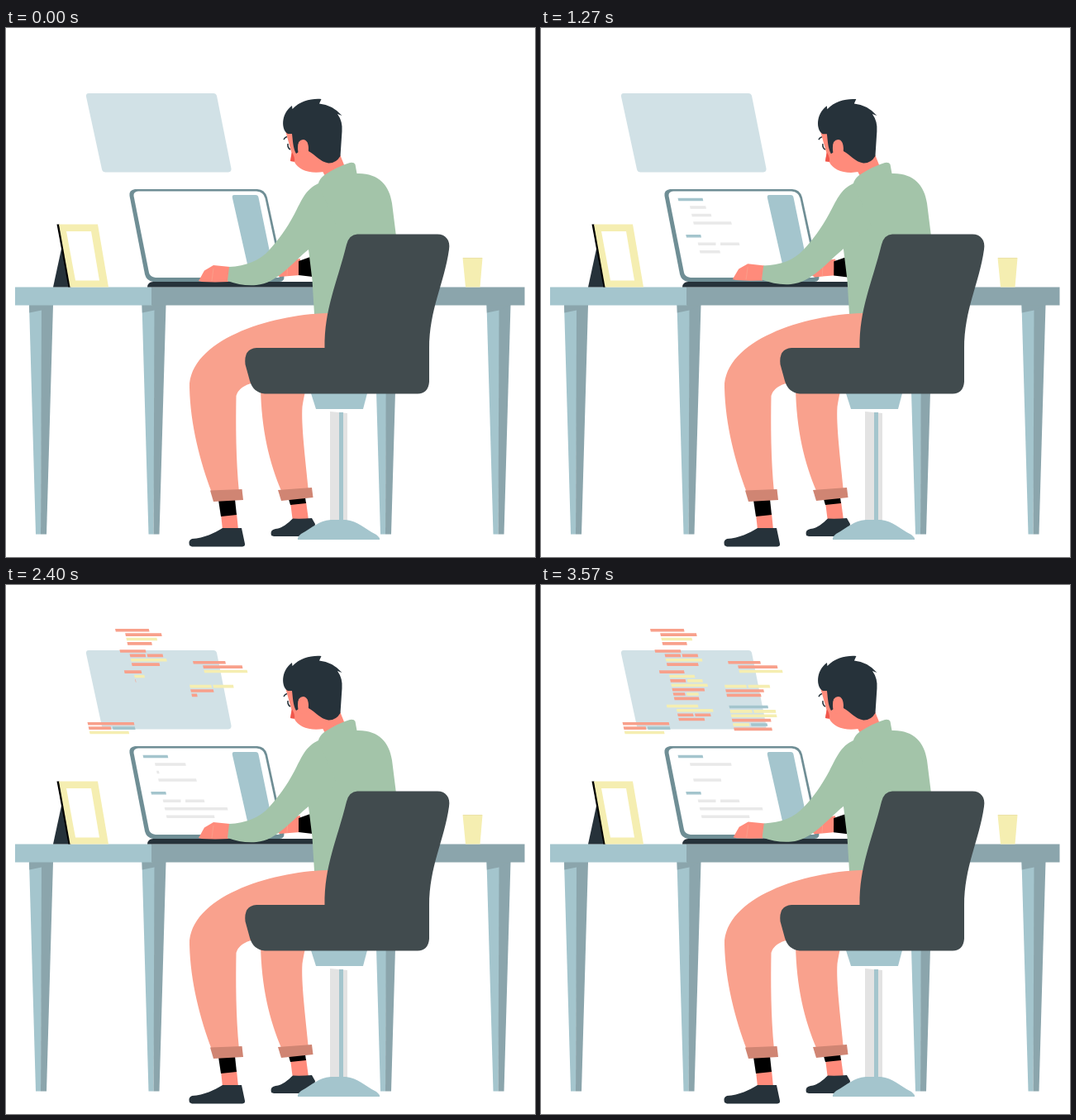
Recreate the animation shown at these times as an HTML page with a canvas. Size 640 by 640 pixels, loop 3.61 s.

```html
<!DOCTYPE html>
<html lang="en">
<head>
<meta charset="utf-8">
<title>At the desk</title>
<style>
html, body { margin: 0; width: 100%; height: 100%; overflow: hidden; background: #fff; }
canvas { display: block; width: 100vw; height: 100vh; }
</style>
</head>
<body>
<canvas id="stage" width="640" height="640"></canvas>
<script>
const ctx = document.getElementById('stage').getContext('2d');
const LOOP = 3610, CYCLE = 1200;
const NAVY = '#26323a', BLUE = '#a4c5cd', SHADE = '#8ba5ac', YELLOW = '#f5eeb1',
      SKIN = '#ff8b7b', PINK = '#f9a18d', GREEN = '#a3c4a9', GREY = '#e3e3e3',
      SLATE = '#414b4e', CUFF = '#d08573', PALE = '#e9e9e9';

const clamp = v => Math.max(0, Math.min(1, v));
const easeOut = u => 1 - (1 - clamp(u)) ** 2;

function fill(color, d) {
  ctx.fillStyle = color;
  ctx.fill(new Path2D(d));
}
function stroke(color, width, d) {
  ctx.strokeStyle = color;
  ctx.lineWidth = width;
  ctx.stroke(new Path2D(d));
}
// Blends two path strings that share the same commands.
function blend(from, to, k) {
  const ends = to.match(/-?[\d.]+/g);
  let i = 0;
  return from.replace(/-?[\d.]+/g, n => (+n + (ends[i++] - n) * k).toFixed(2));
}
// Slanted text bar.
function bar(color, x, width, y) {
  if (width < 0.4) return;
  fill(color, `M${x} ${y}h${width}l.8 3.6h${-width}Z`);
}

// Text follows the slant of its panel; rows below a block's first are indented.
const SLANT = 0.215;
const INK = { p: '#f8a08b', y: YELLOW, b: BLUE };
// Each word is a row and each letter a segment of it.
const panels = [
  { x: 132, y: 53, indent: 11, gap: 3.7, width: 36.5, peak: 11, start: 1467, step: 93,
    blocks: ['p p y p', 'p pp y p', 'p y py y p py p', 'y y pp p'] },
  { x: 226, y: 92, indent: 11, gap: 0, width: 45, peak: 2, start: 1755, step: 122, blocks: ['p p y'] },
  { x: 222, y: 120.8, indent: 0, gap: 8.8, width: 49, peak: 4.5, start: 2121, step: 122,
    blocks: ['yy p p', 'b yy y p yb p'] },
  { x: 98.5, y: 166, indent: 0, gap: 0, width: 50, peak: 0.5, start: 1660, step: 175, blocks: ['p pb y'] }
];

function drawPanel({ x, y, indent, gap, width, peak, start, step, blocks }, t) {
  let row = 0, top = y;
  for (const block of blocks) {
    block.split(' ').forEach((inks, line) => {
      const left = x + SLANT * (top - y) + (line ? indent : 0);
      const whole = width + 7.5 * Math.cos(1.23 * (row - peak));
      const part = (whole - 2 * (inks.length - 1)) / inks.length;
      const span = inks.length > 1 ? 260 : 430;
      [...inks].forEach((ink, j) => {
        const shown = easeOut((t - start - row * step - j * 85) / span);
        bar(INK[ink], left + j * (part + 2), part * shown, top);
      });
      row++;
      top += 5.37;
    });
    top += gap;
  }
}

// Laptop lines are typed one after another, then wiped and retyped in turn.
const noteWidths = [30, 50, 58, 46, 18, 50, 76, 58];

function noteShown(i, t) {
  const typed = clamp((t - 200 * i) / 220);
  const firstBlank = 930 + 250 * i - 13 * i * i;
  const period = 1080;
  const since = t - firstBlank;
  const nearest = since - Math.max(0, Math.round(since / period)) * period;
  return Math.min(typed, clamp((Math.abs(nearest) - 50) / 140));
}

function drawNotes(t) {
  noteWidths.forEach((width, i) => {
    const heading = i % 4 === 0;
    const y = 205.7 + 9.5 * i + (i > 3 ? 6.2 : 0);
    const x = 165.5 + 0.22 * (y - 205.7) + (heading ? 0 : 12.3);
    bar(heading ? BLUE : PALE, x, width * noteShown(i, t), y);
  });
  fill('#fff', 'M211.500 258H217V264H211.500Z');
}

function drawDesk() {
  for (const x of [0, 136.5, 417, 553.5]) {
    ctx.save();
    ctx.translate(x, 0);
    fill(BLUE, 'M28 335H44L42 612.5H36Z');
    fill(SHADE, 'M43 335H57L49 612.5H42Z');
    fill(SHADE, 'M28 335H57L43 341.5L28.3 344.5Z');
    ctx.restore();
  }
  fill(BLUE, 'M11 313.5H177V335.5H11Z');
  fill(SHADE, 'M176 313.5H627.5V335.5H176Z');

  fill(NAVY, 'M67.5 265L57 313.5H77Z');
  fill('#000', 'M61.5 237.5H64.5L78.5 313.5H75.5Z');
  fill(YELLOW, 'M64 237.5H111L124 313.5H77.5Z');
  fill('#fff', 'M73 246H103L113 305.5H84Z');

  fill(YELLOW, 'M552.5 278H576.5L573.5 313.5H556Z');
  stroke('#e8dfa4', .7, 'M553 278.4H576');
}

function drawLaptop(t) {
  fill('#6f8e95', 'M156 195H304Q313 195 316 205L336.5 300Q337 307 331 307H178Q170 306 168 298L149.5 203Q148.5 196 156 195Z');
  fill('#fff', 'M160 197.5H303Q311.5 198 313.5 206L333 297Q333 302 328 302H181Q174 301 173 296L154.5 203Q154 198 160 197.5Z');
  fill(BLUE, 'M276 202H302Q305 202 305.5 205L323 290H293L274 206Q273 202 276 202Z');
  drawNotes(t);
  fill(NAVY, 'M171 313.5Q171.5 307 178 307H372V313.5Z');
}

function drawLegs() {
  fill(SKIN, 'M344 574L363 573L366 595L347 597Z');
  fill('#000', 'M342 570L362 568L363 575L344 577Z');
  fill(NAVY, 'M321 614Q319 607 326 606C335 605 341 599 347 593.5Q358 594 370 593L374 600L372 612Q371 615 366 615H324Z');
  fill(PINK, 'M308 435C309 485 318 525 334 562L366 560C362 520 357 480 358.5 458Q360 448 363 435Z');
  fill(CUFF, 'M329 559L370 556L371.5 568L333 572Z');

  fill(SKIN, 'M260 588L279 587L281 607L262 607Z');
  fill('#000', 'M257 571L277 570L279 589L260 591Z');
  fill(NAVY, 'M222 626Q220 620 225 618C240 617 252 611 262 605H285L289 624Q289.5 627 286 627.5H225Z');
  fill(PINK, 'M388 345C318 347 222 378 222 435C223 480 235 525 249 562H282C278 520 278 480 278.5 445Q282 433 300 429L400 420V345Z');
  fill(CUFF, 'M247 559.5L285.5 558L287 571L251 573Z');
}

function drawChair() {
  fill(GREY, 'M392 464L413 466V600H392Z');
  fill(BLUE, 'M403 465H408V600H403Z');
  fill(BLUE, 'M353 619Q352 616 357 612C372 604 378 596 393 595H411C427 597 432 605 448 613Q453 617 452 619Z');
  fill(BLUE, 'M369 442H437L432 461H375Z');
  fill(SLATE, 'M425 249.5H522C532 249.5 538 257 536 268C530 310 512 340 512 388V428Q511 442 498 442.5H313Q299 441 295 427L289.5 407Q287.500 388 303 387H385.5C385 340 400 310 412 262Q415 250 425 249.5Z');
}

function drawHead(k) {
  ctx.save();
  ctx.translate(395 - 0.5 * k, 165 + 0.6 * k);
  ctx.rotate(-0.013 * k);
  ctx.translate(-395, -165);
  fill(SKIN, 'M338.5 126L345.5 151L344 161L349 162C353 171 367 177 384 174L404 158L396 125Z');
  fill('#f0574c', 'M346 150L344 161L349 161.5Q350 157 346 150Z');
  stroke(NAVY, 1.5, 'M336 135Q337.5 132 340 131.5M341 140Q340.5 145 344 147');
  fill(NAVY, 'M341 128C333 124 332 104 346 94L346.5 98C356 88 370 85 381.5 86L379 91.5Q395 93 406.5 106L401 104Q407.5 113 406.5 125L404.5 155Q399 164 390 163.5C380 162 374 153 366 149L364 138H354V150L351 152C347 145 347 135 346 128Z');
  fill(SKIN, 'M359.5 135C364 135 366 140 366 146Q365 156 359 156C354 155 353 150 353 145Q353 135 359.5 135Z');
  ctx.restore();
}

function drawPerson(t) {
  // Three arm swings per loop, softened at both ends.
  const phase = t % CYCLE / CYCLE;
  const ramp = 1 - Math.abs(1 - 2 * phase);
  const k = (ramp + (1 - Math.cos(Math.PI * ramp)) / 2) / 2 / 0.648;
  const pose = (a, b) => blend(a, b, k);

  fill(SKIN, pose(
    'M325 297L330 289L341 281L356 279L356 299L343 300L331 301Z',
    'M327 304L329.5 295L341 286L358 284L357 301L345 303L333 305Z'));
  stroke(PINK, .8, pose('M341 282L340 300', 'M343 286L342 303'));
  fill('#000', pose('M354 282L368 277L371 301L354 299Z', 'M357 284L370 281L372 306L356 304Z'));

  fill(SKIN, 'M376 160L404 153L410 168L387 181Z');
  drawHead(k);
  fill(GREEN, 'M378 188Q379 183 385 178Q402 167 416 163Q421 162 422.5 165L424.5 176C450 175 464 190 467 212L472 252V346H373L370.5 305L366 268L364 230Z');
  drawLegs();
  fill(SKIN, pose(
    'M233 306L240 293.5L251 287L271 289L269 307L253 307.5L237 307Z',
    'M222.5 290L233 275.5L244 272.2L264 276L261 294L247 292.5L226 291Z'));
  stroke(PINK, .8, pose('M251 291L249 306', 'M244 275L241 291'));
  fill(GREEN, pose(
    'M378 188C362 195 357 210 349 225C339 244 329 257 319 268C307 282 290 288 270 289L268 306C280 310 290 312 303 311C328 309 346 284 366 268L400 240Z',
    'M378 188C362 195 357 208 346 223C335 239 324 253 313 263C300 274 284 278 263 276L260 293C270 298 283 302 297 302C323 301 344 280 364 262L400 240Z'));
}

function draw(t) {
  ctx.fillStyle = '#fff';
  ctx.fillRect(0, 0, 640, 640);
  fill('#d1e1e6', 'M100 79H251Q254 79 255 82L272.5 170Q273 174 269 174.5H120Q116.5 174 116 171L97 83Q96.5 79 100 79Z');
  panels.forEach(panel => drawPanel(panel, t));
  drawDesk();
  drawLaptop(t);
  drawPerson(t);
  drawChair();
}

const began = performance.now();
function tick() {
  draw((performance.now() - began) % LOOP);
  requestAnimationFrame(tick);
}
tick();
</script>
</body>
</html>
```
